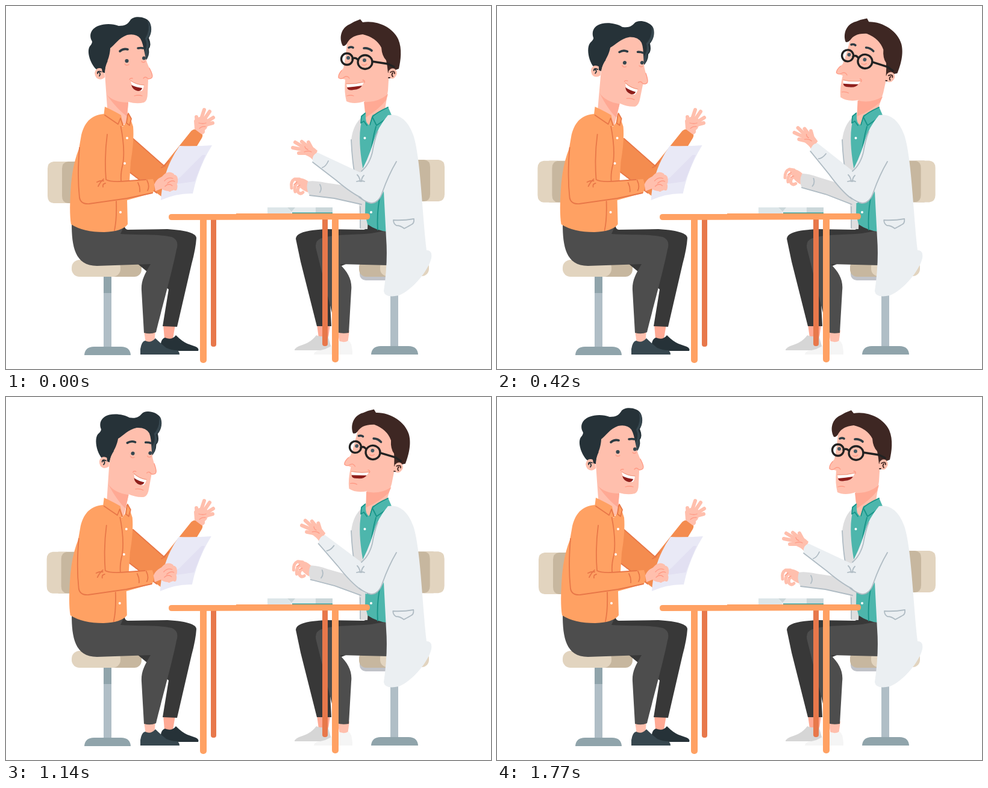
An HTML page for the animation above (1800 ms loop, 805 px wide and 602 px high).

```html
<!DOCTYPE html>
<html>
<head>
<meta charset="utf-8">
<style>
html,body{margin:0;width:100%;height:100%;overflow:hidden;background:#fff}
svg{display:block;width:100vw;height:100vh}
.line{fill:none;stroke-width:1.8;stroke-linecap:round;stroke-linejoin:round}
.skin{fill:#ffbfad}
.finger{fill:none;stroke:#ffbfad;stroke-width:6;stroke-linecap:round;stroke-linejoin:round}
.crease{stroke:#ff9a85;stroke-width:1.3}
.seam{stroke:#e87748}
.fold{stroke:#b0bcc4}
.teal{stroke:#179488}
.orange{fill:#ffa163}.rust{fill:#e8784b}
.light{fill:#e2d4bf}.dark{fill:#c7b79f}
.pole{fill:#b0bec6}.steel{fill:#90a4ab}
.near{fill:#4d4d4d}.far{fill:#383838}
</style>
</head>
<body>
<svg viewBox="0 0 805 602">

<!-- patient's chair -->
<g id="chairL">
  <path class="dark" d="M88 258H118V327H88Z"/>
  <path class="light" d="M79 258H103Q93 259 93 270V315Q93 326 103 327H79Q69 326 69 315V270Q69 259 79 258Z"/>
</g>
<rect class="pole" x="162" y="470" width="13" height="97"/>
<rect class="steel" x="162" y="446" width="13" height="30"/>
<path class="steel" d="M130 579Q131 565 146 565H191Q206 565 207 579Z"/>
<rect class="dark" x="150" y="421" width="75" height="28" rx="12"/>
<rect class="light" x="109" y="421" width="81" height="28" rx="13"/>

<!-- patient's legs -->
<path class="skin" d="M229 538H248L246 560H232Z"/>
<path fill="#ffa994" d="M261 528H281L277 552H263Z"/>
<path fill="#263238" d="M257 572Q255 552 264 550Q275 555 282 546Q292 556 301 560L315 565Q321 568 319 572Z"/>
<path fill="#37474f" d="M223 578V569Q225 556 231 555Q240 560 248 551Q257 560 266 567Q275 571 284 571Q288 573 288 578Z"/>
<path class="far" d="M185 361H197Q196 370 202 371L268 370C300 372 316 377 316 385Q315 402 308 428L284 532L260 531L270 470L185 400Z"/>
<path class="near" d="M109 360C109 398 114 431 151 431L240 428C229 446 224 457 225 472L229 542Q240 545 249 541C255 515 276 440 283 404Q288 388 275 383C255 378 220 380 190 378L198 360Z"/>

<!-- patient's raised arm -->
<path fill="#f48c4f" d="M208 217L262 264L306 209Q312 201 320 207Q329 211 325 219L300 260L275 300L258 316L200 272Z"/>
<path class="line seam" d="M211 220L262 265L270 257M203 274L250 310M264 265L258 268"/>
<path class="skin" d="M313 204L312 190Q320 180 334 187Q338 200 330 206Q331 212 325 213Z"/>
<path class="finger" d="M317 194L316 184M323 190L329 172M327 191L338 175M330 194L344 185M328 198L343 194"/>
<path class="line crease" d="M320 194Q327 196 332 194M321 203Q325 199 331 200"/>

<!-- patient's head -->
<g id="headL">
  <path fill="#263238" d="M151 106C141 98 133 76 139 67Q145 60 142 57C137 46 143 37 153 33C163 29 177 29 187 33C198 33 202 30 206 24C211 15 234 17 239 28C243 37 241 47 237 53Q242 65 237 71Q239 83 231 92L164 111Z"/>
  <path fill="#37474f" d="M235 24C244 34 241 48 234 55Q240 65 235 71Q238 84 231 91L230 76Q236 65 231 54Q240 40 235 24Z"/>
  <path class="skin" d="M164 111C164 95 172 90 173 70C181 64 187 53 201 48Q216 45 223 54C230 66 229 84 237 101Q246 116 242 119L236 122L235 145Q235 157 229 160Q217 163 203 159L200 196H170Q167 155 164 111Z"/>
  <path fill="#ffa994" d="M167 147Q179 160 203 160L201 183Q186 173 167 147Z"/>
  <path class="skin" d="M163 108Q158 101 151 104Q144 110 150 119Q157 125 164 118Z"/>
  <path fill="#263238" d="M158 98L169 91Q164 99 164 111L160 110Z"/>
  <path class="line" stroke="#263238" d="M158 109Q151 107 152 112M154 110Q158 112 155 116"/>
  <path class="line" stroke="#2d3b42" style="stroke-width:3.6" d="M189 75Q195 70 202 72M219 70Q224 69 228 70"/>
  <circle cx="200.500" cy="91" r="3.100" fill="#37474f"/>
  <circle cx="229" cy="86.500" r="3" fill="#37474f"/>
  <path class="line crease" d="M197 96Q200 100 204 97M225 92Q228 95 231 92M238 103Q245 116 242 119Q238 122 235 120Q231 116 228 120M205 122Q206 119 210 120M213 149Q220 147 226 149"/>
  <path fill="#fff" d="M207 124Q217 131 229 131Q228 139 225 141Q210 141 207 124Z"/>
  <path fill="#8e1f1c" d="M208 131Q216 135 226 136Q225 141 219 141Q210 139 208 131Z"/>
  <path class="line" stroke="#ee8d72" style="stroke-width:1" d="M207 124Q217 131 229 131"/>
</g>

<!-- patient's paper and shirt -->
<g id="bodyL">
  <path fill="#e9e9f6" d="M288 232Q314 233 342 231Q319 268 310 311Q284 310 257 322Q260 272 288 232Z"/>
  <path fill="#e2e0f2" d="M326 247L289 284Q276 292 270 297L313 291L331 247Z"/>
  <path class="orange" d="M164 179C144 180 131 190 125 214L121 237Q109 266 107 310Q105 345 108 362Q128 375 163 375Q193 374 202 362L201 322L244 310Q249 299 244 287L205 290L207 258Q213 223 211 200L206 185L194 200Z"/>
  <path class="line seam" d="M168 213Q163 250 166 288Q175 293 204 290L232 288M122 235C119 270 120 300 122 318Q124 329 138 328L201 319L243 310M190 197Q198 236 194 262Q190 277 191 290M183 324Q184 354 180 372M219 293Q223 301 222 308M151 292Q157 289 162 290M153 299Q157 291 162 287M165 294Q160 295 161 300M234 289Q239 299 235 306"/>
  <path class="orange" d="M164 167Q181 175 191 181Q192 190 196 199L186 199L162 183ZM202 177L208 186L206 199L197 199Q201 190 202 177Z"/>
  <path class="line seam" d="M164 181L186 196L190 186L194 198M202 180L200 194L205 198L208 187L203 178"/>
  <g fill="#fff"><circle cx="201" cy="219" r="2"/><circle cx="197" cy="261" r="2"/><circle cx="190" cy="342" r="2"/></g>
  <path class="skin" d="M246 296Q250 286 261 282Q272 276 281 288Q286 302 277 306Q266 309 258 303L248 307Z"/>
  <path class="finger" d="M262 284Q269 276 276 280M270 286Q284 277 282 292M272 296Q284 291 281 303M264 298Q274 295 272 305"/>
  <path class="line crease" d="M263 290Q269 283 277 286M268 294Q275 288 280 291M264 299Q270 293 276 298"/>
</g>

<!-- doctor's chair -->
<g id="chairR">
  <path class="dark" d="M680 255H710V324H680Z"/>
  <path class="light" d="M694 255H718Q728 256 728 267V312Q728 323 718 324H694Q704 323 704 312V267Q704 256 694 255Z"/>
</g>
<rect class="pole" x="638" y="470" width="13" height="96"/>
<path class="steel" d="M606 578Q607 564 622 564H668Q683 564 684 578Z"/>
<rect x="587" y="430" width="60" height="25" rx="10" fill="#c0c2c8"/>
<rect class="dark" x="586" y="421" width="75" height="28" rx="12"/>
<rect class="light" x="621" y="421" width="81" height="27" rx="12"/>

<!-- doctor's legs -->
<path fill="#ffa994" d="M516 528H538L535 550H519Z"/>
<path class="skin" d="M550 538H570L567 560H554Z"/>
<path fill="#d6d6d6" d="M479 571Q479 566 492 562Q507 557 515 546Q523 550 534 546L541 571Z"/>
<path fill="#f5f5f5" d="M511 578Q511 572 522 571Q539 568 550 554Q560 560 568 555Q575 558 575 578Z"/>
<path class="far" d="M481 386C482 376 498 372 530 370L594 371Q600 370 600 361H632V400L535 440L540 531L516 531L489 424Z"/>
<path class="near" d="M515 404Q511 389 524 385C545 378 578 380 606 377L634 372V430L554 428C568 442 575 455 573 472L569 542Q558 544 549 541Z"/>

<!-- doctor's far side -->
<path fill="#dededf" d="M592 183Q576 196 573 222Q575 270 585 310L588 370H600L608 230Z"/>
<path class="line fold" d="M573 222Q575 270 584 303M588 333V368"/>
<g id="armLow">
  <path class="skin" d="M502 291Q489 282 479 288L485 297Q490 305 501 309Z"/>
  <path class="finger" style="stroke-width:5" d="M487 287L479 287Q472 291 474 302M485 292Q477 297 480 308M490 297Q482 302 485 309Q489 313 493 309"/>
  <path class="line crease" d="M483 292L478 296M488 297L483 300"/>
  <path fill="#dededf" d="M501 291Q510 289 530 293L592 302V329L545 319L504 314Q497 303 501 291Z"/>
  <path class="line fold" d="M504 314L545 319L590 329M521 296Q525 303 521 309"/>
</g>
<path fill="#4db6ac" d="M592 184Q583 212 591 262L597 300L596 345L600 362Q614 372 632 374L640 260L634 178Z"/>

<!-- doctor's head -->
<g id="headR">
  <path class="skin" d="M566 60Q564 84 560 103Q550 114 552 119L563 122Q561 143 565 158Q577 164 595 158L597 190Q603 202 608 196L629 172L634 140L637 90L615 45L580 43Z"/>
  <path fill="#ffa994" d="M594 159Q616 161 634 146L631 156Q618 172 597 185Z"/>
  <path fill="#3e2723" d="M559 66C552 53 556 36 571 30Q579 25 588 22L592 27C615 23 642 35 651 55C658 71 655 91 652 104L634 111Q633 99 631 90Q624 83 623 69Q614 52 592 47C575 49 570 55 566 62Q563 67 559 66Z"/>
  <path class="skin" d="M635 108Q640 101 646 105Q652 111 645 119Q640 123 634 117Z"/>
  <path class="line" stroke="#3e2723" d="M638 110Q645 106 645 112M642 111Q639 114 642 117M635 119L637 119"/>
  <path class="line" stroke="#2d3b42" style="stroke-width:3.600" d="M569 69Q573 67 576 69M594 70Q601 69 607 74"/>
  <path fill="#fff" d="M556 89Q558 79 565 79Q560 89 563 97Q556 96 556 89Z"/>
  <circle cx="568" cy="86" r="3" fill="#455a64"/><circle cx="595" cy="90" r="3" fill="#455a64"/>
  <path class="line" stroke="#222" style="stroke-width:3.300" d="M575 88Q579 84 584 89M608 92L634 96L644 101"/>
  <g fill="none" stroke="#222" stroke-width="3.300"><ellipse cx="566" cy="88" rx="9.500" ry="9.500"/><ellipse cx="596" cy="93" rx="12" ry="11.500"/></g>
  <path class="line crease" d="M591 97Q595 100 599 96M557 107Q551 114 552 119Q556 122 560 119Q566 114 570 120M592 123Q596 123 595 127M566 149Q572 147 577 149"/>
  <path fill="#fff" d="M565 129Q580 130 594 126Q589 139 577 139Q566 141 565 129Z"/>
  <path fill="#8e1f1c" d="M566 135Q578 134 591 132Q587 139 577 139Q567 141 566 135Z"/>
  <path class="line" stroke="#ee8d72" style="stroke-width:1" d="M565 129Q580 130 594 126"/>
</g>

<!-- doctor's collar and coat -->
<path fill="#4db6ac" d="M597 176L590 182L589 195L599 199L597 186ZM634 167Q618 177 608 181L603 199L614 201L640 181Z"/>
<path class="line teal" d="M596 178L590 183L589 194L594 191L599 198M634 168Q614 177 608 184L604 197M608 184L615 198L637 183M614 200Q606 228 605 258M622 309Q615 340 617 371"/>
<g fill="#fff"><circle cx="595.500" cy="219" r="2"/><circle cx="606" cy="342" r="2"/></g>
<g id="armHigh">
  <path class="skin" d="M517 240Q503 226 491 232Q486 243 499 248Q508 252 510 257Z"/>
  <path class="finger" d="M496 239L476 235M497 236L480 226M502 234L491 225M508 237L502 226M498 244L486 244"/>
  <path class="line crease" d="M496 233Q497 237 501 238M495 242Q502 239 507 242"/>
  <path fill="#ebeff2" d="M517 243Q507 247 509 259L548 289Q584 318 604 325L620 300L592 278Z"/>
  <path class="line fold" d="M509 259L548 289Q575 312 594 320M535 257Q531 266 525 268"/>
</g>
<path fill="#ebeff2" d="M634 181C655 177 669 194 676 214C688 250 690 335 698 405Q708 405 706 418C701 440 673 472 652 480Q629 485 627 473Q634 425 631 385L627 307Q618 326 605 327Q590 322 581 306L586 280Q600 258 610 225Q617 201 634 181Z"/>
<path class="line fold" d="M617 208Q611 224 608 243Q603 263 590 274M648 258Q635 280 625 308Q619 327 606 327Q596 325 586 317M583 280Q587 284 588 291M582 291Q590 289 595 291M594 281Q590 285 590 291"/>
<path id="pocket" class="line fold" d="M643 355Q660 356 677 353Q678 361 672 363Q665 367 661 369Q655 364 648 364Q643 361 643 355Z"/>

<!-- book and table -->
<path fill="#dde6e9" d="M434 334H473V345H434Z"/>
<path fill="#e6ecee" d="M467 334H514V344H474Z"/>
<path fill="#cbd7da" d="M514 334H542V344H514ZM467 334H480L474 341Z"/>
<path fill="#3a9f95" d="M475 342.500H542V345H475Z"/>
<rect class="rust" x="340" y="350" width="9" height="215" rx="4"/>
<rect class="rust" x="525" y="350" width="9" height="214" rx="4"/>
<rect class="orange" x="322" y="350" width="11" height="242" rx="5"/>
<rect class="orange" x="541" y="350" width="11" height="241" rx="5"/>
<path class="orange" d="M275 345H382V344H599Q604 344 604 349Q604 354 599 354L275 355Q270 355 270 350Q270 345 275 345Z"/>
</svg>

<script>
const LOOP = 1800, STEP = 30;
const set = (id, value) => document.getElementById(id).setAttribute('transform', value);
const ease = (t, from, to) => {
  const x = Math.min(1, Math.max(0, (t - from) / (to - from)));
  return x * x * (3 - 2 * x);
};

function draw() {
  const t = Math.floor(performance.now() % LOOP / STEP) * STEP;
  const lean = ease(t, 0, 600) - ease(t, 930, 1490);
  const turn = (id, angle, x, y) => set(id, `rotate(${angle * lean} ${x} ${y})`);
  const shift = (id, x, y) => set(id, `translate(${x * lean} ${y * lean})`);

  turn('headL', 11.5, 187, 165);
  turn('headR', 11.5, 610, 187);
  turn('armHigh', 17, 592, 298);
  turn('armLow', 11, 590, 320);
  shift('bodyL', -1.8, 0);
  shift('chairL', -2, -1.7);
  shift('chairR', -0.5, 1.8);
  shift('pocket', -1, 0);
  requestAnimationFrame(draw);
}
draw();
</script>
</body>
</html>
```
